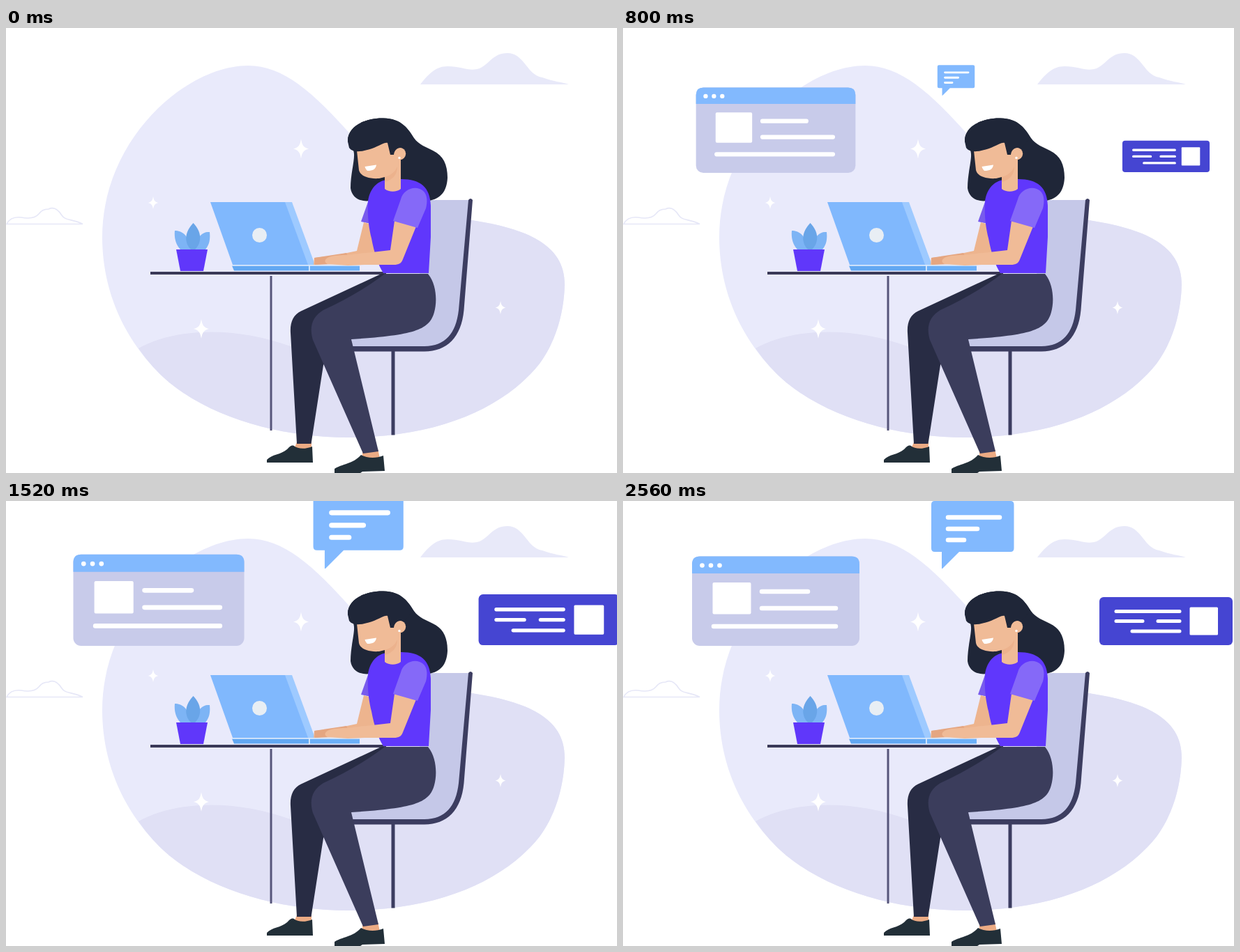
An HTML page for the animation above (2.88 s loop, 876 by 639 pixels).

```html
<!DOCTYPE html>
<html lang="en">
<head>
<meta charset="utf-8">
<title>Working at a desk</title>
<style>
  html, body { margin: 0; width: 100%; height: 100%; overflow: hidden; background: #fff; }
  svg { display: block; width: 100%; height: 100%; }
  .line { fill: none; stroke: #fff; stroke-linecap: round; }
</style>
</head>
<body>
<svg viewBox="0 0 876 639" xmlns="http://www.w3.org/2000/svg">
  <defs>
    <path id="star" fill="#fff" d="M0-14C1.5-5 3.5-2 11 0C3.5 2 1.5 5 0 14C-1.5 5-3.5 2-11 0C-3.5-2-1.5-5 0-14Z"/>
  </defs>

  <g id="backdrop">
    <path fill="#e9eafb" d="M347 54C398 54 440 92 497 156C540 210 580 262 668 276C745 288 801 310 801 368C800 415 785 455 765 482C715 545 620 588 490 588C400 588 300 563 234 509C180 462 138 390 138 300C138 160 258 54 347 54Z"/>
    <path fill="#e0e0f5" d="M190 460C240 432 325 426 411 458L495 448L600 270L668 276C745 288 801 310 801 368C800 415 785 455 765 482C715 545 620 588 490 588C400 588 300 563 234 509Q209 488 190 460Z"/>
    <path fill="#e8e9f9" d="M594 81C606 66 616 55 633 55C654 55 664 63 679 58C693 52 698 36 719 36C743 36 747 68 769 71C785 77 799 78 807 81Z"/>
    <path fill="#fff" stroke="#e6e7f7" stroke-width="1.6" d="M1 281.500C5 273 13 271 22 272C33 274 42 273 47 267C51 261 56 260 61 260C69 256 75 261 80 269C85 277 95 274 110 281.500Z"/>
    <use href="#star" transform="translate(423 173.500)"/>
    <use href="#star" transform="translate(211 251) scale(.66)"/>
    <use href="#star" transform="translate(280 432)"/>
    <use href="#star" transform="translate(709 401.500) scale(.68)"/>
  </g>

  <g id="chair">
    <path fill="#c5c8e8" d="M600 247H664L651 405C647 440 630 460 598 460H497L494 440L590 400Z"/>
    <path fill="#3c3d60" d="M663 247Q666 243 669 247L656.500 405C653 444 632 464.500 600 464.500H497V457H600C630 456.500 645 439 649 405Z"/>
    <path stroke="#3c3d60" stroke-width="5" d="M555 463V584.500"/>
  </g>

  <g id="desk">
    <path stroke="#3a3957" stroke-width="4" d="M207 352H545"/>
    <path stroke="#56557a" stroke-width="3" d="M380 356V578"/>
    <path fill="#7db4f5" d="M242 291C252 291 262 297 265 318H250C243 310 241 301 242 291ZM292 293C282 292 274 299 270 318H286C292 311 293 302 292 293Z"/>
    <path fill="#69a5e8" d="M268.500 280C281 293 281 308 271 318H265C255 308 256 293 268.500 280Z"/>
    <path fill="#6037fa" d="M244 318H289L283 349H250Z"/>
    <path fill="#80b8fd" d="M293 250H402L434 340H325Z"/>
    <path fill="#9ecaff" d="M400 250H410L443 340H433Z"/>
    <circle cx="363.500" cy="297.500" r="10.500" fill="#e8eef4"/>
    <path fill="#62a8f2" d="M324 341.500H434V348.500H327Z"/>
    <path fill="#6cb0f8" d="M435.500 341.500H507V348.500H435.500Z"/>
    <path stroke="#d9e9fc" stroke-width="1.500" d="M324 340.700H507M434.800 341V349"/>
  </g>

  <g id="woman">
    <path fill="#1f2638" d="M497 174C503 182 494 205 494 230C496 244 508 250 522 248L560 235L607 248C622 245 632 236 633 215C633 196 627 183 612 176C603 171 592 168 585 158C577 145 567 129.500 541 129.500C515 129 489 141 490 163Z"/>
    <path fill="#785bed" d="M520 247L509 278L523 281Z"/>
    <path fill="#edb48e" d="M513 279L524 282L530 325L490 336L441 340L442 330L470 327L503 320Z"/>
    <path fill="#e5a681" d="M442 330L488 323L495 338L443 340Z"/>
    <path fill="#6037fc" d="M545 218C529 221 521 234 519 249C518 270 520 286 524 302C528 324 534 341 541 352H606L609 300V255C608 229 595 217 566 217Z"/>
    <path fill="#f0bb97" d="M503 176L506 204C508 213 520 217 535 216L543 214V231C549 236 560 236 566 231V185L555 160H515Z"/>
    <path fill="#ecb28d" d="M543 214C553 211 558 206 561 199C561 210 555 218 543 221Z"/>
    <circle cx="564.500" cy="180.500" r="8.700" fill="#f0bb97"/>
    <circle cx="564" cy="186.500" r="1.700" fill="#fff"/>
    <path fill="#fff" d="M514.500 199L531 196.500C530 203 526 205 518 205C516 203 515 201 514.500 199Z"/>
    <path fill="#1f2638" d="M490 163C489 141 515 129 541 129.500C567 130 577 146 584 158L572 172C562 171 557 174 556 182L551 182L547 165C543 163 533 171 520 174.500C508 178 497 179 492 172Z"/>
    <path fill="#f0bb97" d="M557 277L588 285L569 332C567 338 563 340 556 340H508V324L551 319Z"/>
    <path id="hand" fill="#f0bb97"/>
    <path fill="#8569f8" d="M566 246C569 234 582 227 593 231C604 235 605 247 602 259L590 287L555 277Z"/>

    <path fill="#ecab84" d="M417 595H438V606H412ZM511 607L533 604L536 618H511Z"/>
    <path fill="#282c44" d="M539 352.500L423 406.500C412 412 407 422 408 438L417 597H437.500L455 484L500 400L570 360Z"/>
    <path fill="#3b3d5c" d="M543 353H605C618 369 618 394 614 408C607 434 585 441 495 447L534 608L512 611L440 448C434 428 440 414 455 405C490 389 520 371 543 353Z"/>
    <path fill="#222f38" d="M374 624V620C381 612 394 613 403 605C406 602 408 599 412 599.500C419 605 429 605 439 601L440 624ZM471 639V633C481 626 498 626 509 613C518 618 531 618 541 614L543 636L511 637L508 639Z"/>
  </g>

  <g id="page">
    <rect x="99" y="79.500" width="240" height="128.500" rx="11" fill="#c8cbea"/>
    <path fill="#82b9fe" d="M99 104V90.500Q99 79.500 110 79.500H328Q339 79.500 339 90.500V104Z"/>
    <g fill="#fff">
      <circle cx="113.500" cy="92.500" r="3.300"/><circle cx="126" cy="92.500" r="3.300"/><circle cx="138.500" cy="92.500" r="3.300"/>
      <rect x="128.500" y="117" width="55" height="45.500" rx="2"/>
    </g>
    <path class="line" stroke-width="6.500" d="M199 130H265M199 154H305M130 180H305"/>
  </g>

  <g id="banner">
    <rect x="683" y="138" width="191" height="69" rx="6" fill="#4545d2"/>
    <rect x="812.500" y="152.500" width="40.500" height="40" rx="1.500" fill="#fff"/>
    <path class="line" stroke-width="5" d="M707 158.500H798M707 172.500H745M767 172.500H798M730 187H798"/>
  </g>

  <g id="bubble">
    <path fill="#82b9fe" d="M447 0H555.500Q560.500 0 560.500 5V68Q560.500 73 555.500 73H482L458 97H457V73H447Q442 73 442 68V5Q442 0 447 0Z"/>
    <path class="line" stroke-width="6.500" d="M466 23.500H540M466 40H508M466 56H489"/>
  </g>
</svg>

<script>
const LOOP = 2880, STEP = 80, LAST = 2560, TYPING = 800;
const $ = id => document.getElementById(id);

// Pop-in with overshoot: [ms, scale]
const POP = [
  [60, 0], [140, .07], [260, .181], [350, .305], [470, .466], [570, .64],
  [790, .942], [980, 1.092], [1090, 1.11], [1200, 1.085], [1300, 1.057],
  [1420, 1.034], [1520, 1.021], [1760, 1.009], [2050, 1]
];

// Each card grows from its anchor point after a delay.
const cards = [
  { el: $('page'), x: 219, y: 208, delay: 0 },
  { el: $('banner'), x: 778.5, y: 207, delay: 220 },
  { el: $('bubble'), x: 458, y: 97, delay: 340 }
];

function slope(i) {
  if (i === 0 || i === POP.length - 1) return 0;
  const [a, b] = [POP[i - 1], POP[i + 1]];
  return (b[1] - a[1]) / (b[0] - a[0]);
}

function pop(t) {
  if (t <= POP[0][0]) return 0;
  const i = POP.findIndex(p => p[0] >= t);
  if (i < 0) return 1;
  const [t0, a] = POP[i - 1], [t1, b] = POP[i];
  const d = t1 - t0, u = (t - t0) / d, v = 1 - u;
  return a * v * v * (1 + 2 * u) + b * u * u * (3 - 2 * u)
    + d * u * v * (slope(i - 1) * v - slope(i) * u);
}

function lift(t) {
  const p = t % TYPING;
  if (t >= 2400 || p < 480 || p > 640) return 0;
  return p > 600 ? .5 : 1;
}

function draw(ms) {
  const t = Math.min(Math.floor(ms % LOOP / STEP) * STEP, LAST);
  for (const { el, x, y, delay } of cards) {
    const s = pop(t - delay);
    el.setAttribute('visibility', s > 0 ? 'visible' : 'hidden');
    el.setAttribute('transform', `translate(${x} ${y}) scale(${s}) translate(${-x} ${-y})`);
  }
  const h = lift(t);
  $('hand').setAttribute('d',
    `M515 323L490 ${326 - 3 * h}C482 ${326 - 7 * h} 472 ${326 - 12 * h} 463 ${329 - 9 * h}` +
    `C456 ${332 - 5 * h} 456 ${337 - 6 * h} 461 339L490 341L515 340Z`);
}

const start = performance.now();
function tick(now) {
  draw(Math.max(0, now - start));
  requestAnimationFrame(tick);
}
draw(0);
requestAnimationFrame(tick);
</script>
</body>
</html>
```
